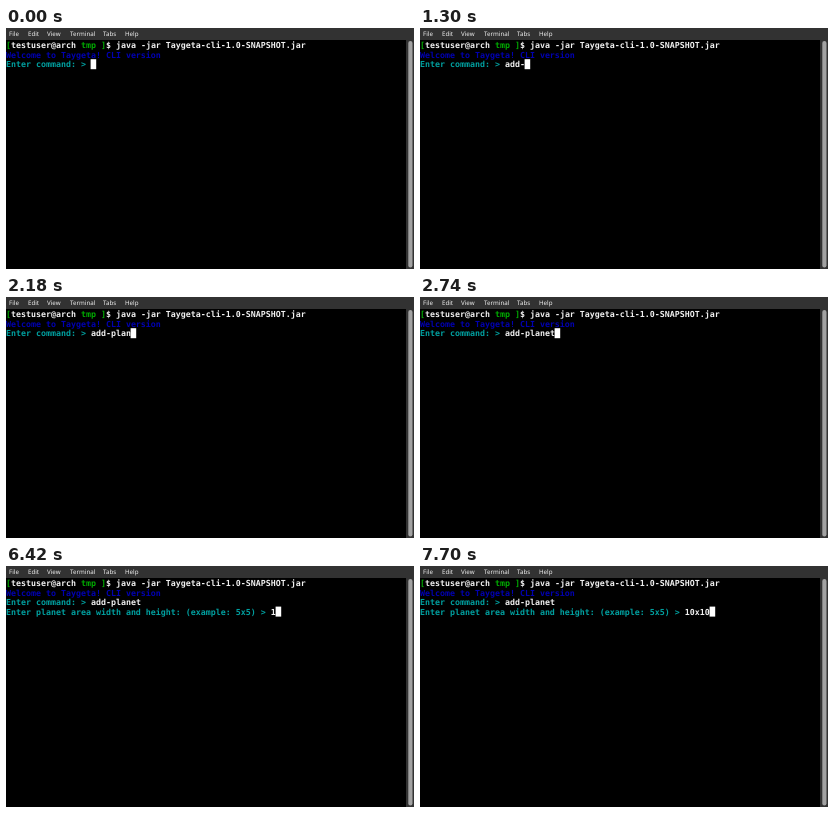
Recreate the animation shown at these times as an HTML page. Size 408 by 241 pixels, loop 8 s.

```html
<!DOCTYPE html>
<html lang="en">
<head>
<meta charset="utf-8">
<title>Terminal session</title>
<style>
  html, body { margin: 0; width: 100%; height: 100%; overflow: hidden; background: #000; }
  svg { display: block; width: 408px; height: 241px; }
  text { white-space: pre; text-rendering: geometricPrecision; }
  .menu { font: 6.2px "Noto Sans", "Open Sans", sans-serif; fill: #f0f0f0; }
  .term { font: bold 8.305px "DejaVu Sans Mono", monospace; fill: #f0f0f0; }
  .green { fill: #00ac00; }
  .cyan { fill: #00a0a0; }
  .blue { fill: #0000b0; }
</style>
</head>
<body>
<svg viewBox="0 0 408 241">
  <rect width="408" height="241" fill="#000"/>
  <rect width="408" height="12" fill="#323232"/>
  <rect x="400" y="12" width="8" height="229" fill="#323232"/>
  <rect x="402.3" y="13" width="4.2" height="226.5" rx="2.1" fill="#a2a2a2"/>
  <g class="menu" id="menu"></g>
  <g class="term">
    <text y="20"><tspan class="green">[</tspan>testuser@arch <tspan class="green">tmp ]</tspan>$ java -jar Taygeta-cli-1.0-SNAPSHOT.jar</text>
    <text y="29.6" class="blue">Welcome to Taygeta! CLI version</text>
    <text y="39.1"><tspan class="cyan">Enter command: &gt; </tspan><tspan id="command"></tspan></text>
    <text y="48.7"><tspan class="cyan" id="question"></tspan><tspan id="answer"></tspan></text>
  </g>
  <rect id="cursor" width="5.6" height="10" fill="#fff"/>
</svg>
<script>
const LOOP = 8000;
const CHAR_WIDTH = 5;
const ENTER_AT = 3380;
const QUESTION_AT = 3460;
const PROMPT = "Enter command: > ";
const QUESTION = "Enter planet area width and height: (example: 5x5) > ";
const COMMAND = {
  text: "add-planet",
  keys: [500, 820, 980, 1300, 1620, 1780, 2020, 2180, 2420, 2740]
};
const ANSWER = { text: "10x10", keys: [6420, 6580, 7060, 7460, 7700] };
const MENU = { File: 3, Edit: 22, View: 41, Terminal: 64, Tabs: 97, Help: 119 };

const byId = id => document.getElementById(id);
const [command, question, answer, cursor] =
  ["command", "question", "answer", "cursor"].map(byId);

for (const [label, x] of Object.entries(MENU)) {
  const item = document.createElementNS("http://www.w3.org/2000/svg", "text");
  item.setAttribute("x", x);
  item.setAttribute("y", 8.3);
  item.textContent = label;
  byId("menu").append(item);
}

const typed = ({ text, keys }, t) => text.slice(0, keys.filter(key => key <= t).length);

function setText(node, value) {
  if (node.textContent !== value) node.textContent = value;
}

function render(t) {
  const commandText = typed(COMMAND, t);
  const questionText = t >= QUESTION_AT ? QUESTION : "";
  const answerText = typed(ANSWER, t);
  const entered = t >= ENTER_AT;
  const line = entered ? questionText + answerText : PROMPT + commandText;

  setText(command, commandText);
  setText(question, questionText);
  setText(answer, answerText);
  cursor.setAttribute("x", line.length * CHAR_WIDTH - 0.4);
  cursor.setAttribute("y", entered ? 40.6 : 31.2);
}

const start = performance.now();
function tick() {
  render((performance.now() - start) % LOOP);
  requestAnimationFrame(tick);
}
tick();
</script>
</body>
</html>
```
